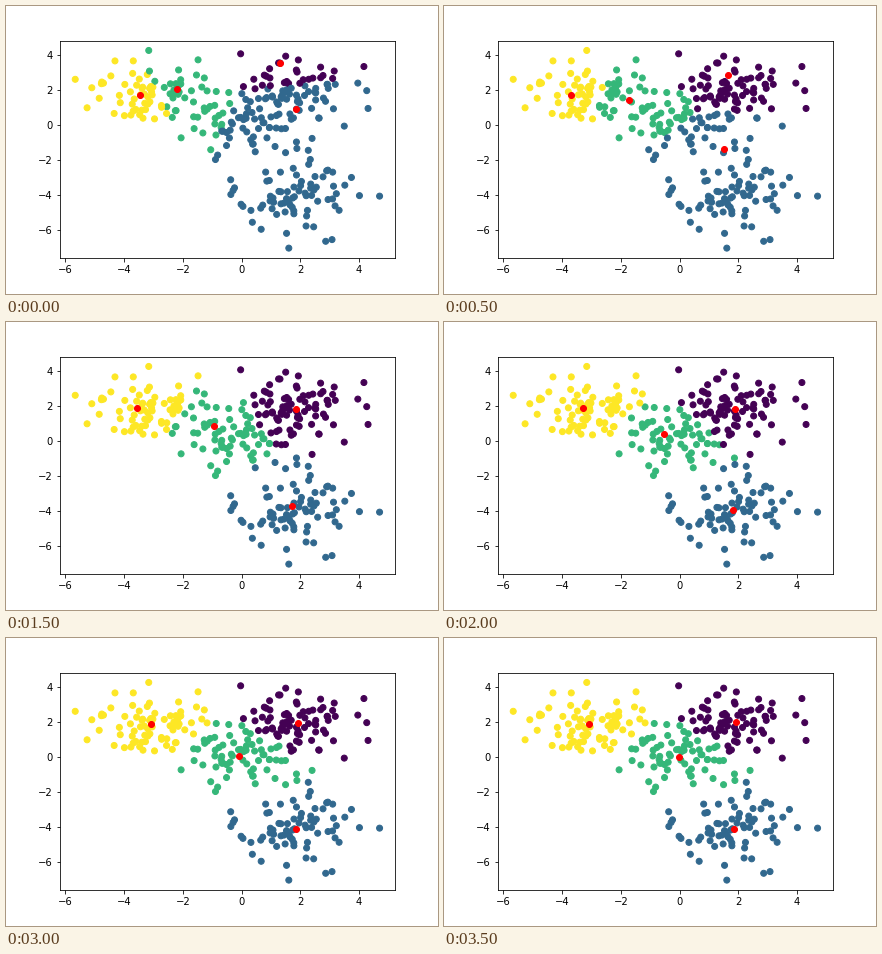
Write a matplotlib script that moves like this. It is 432 by 288 pixels and loops after 4000 ms.

```python
import matplotlib.pyplot as plt
import numpy as np
from matplotlib.animation import FuncAnimation

FRAMES, INTERVAL = 8, 500
BLOBS = [(0, 0), (2, 2), (-3, 2), (2, -4)]
PER_BLOB = 75
STARTS = [(1.308, 3.536), (1.868, 0.906), (-2.185, 2.059), (-3.441, 1.72)]


def make_points():
    rng = np.random.RandomState(0)
    points = np.concatenate(
        [rng.normal(blob, 1, (PER_BLOB, 2)) for blob in BLOBS])
    order = np.arange(len(points))
    rng.shuffle(order)
    return points[order]


def nearest(points, centers):
    """Index of the closest center for every point."""
    gaps = points[:, None] - np.asarray(centers)[None]
    return (gaps ** 2).sum(axis=2).argmin(axis=1)


def lloyd(points, centers, steps):
    """Centers and labels for each k-means step."""
    history = []
    for _ in range(steps):
        labels = nearest(points, centers)
        history.append((centers, labels))
        centers = np.array([points[labels == k].mean(axis=0)
                            for k in range(len(centers))])
    return history


points = make_points()
seeds = points[nearest(np.array(STARTS), points)]
history = lloyd(points, seeds, FRAMES)

plt.rcParams.update({"font.family": "DejaVu Sans", "font.size": 10})
fig, ax = plt.subplots(figsize=(6, 4), dpi=72, facecolor="white")
fig.subplots_adjust(left=0.125, right=0.9, bottom=0.125, top=0.88)

dots = ax.scatter(*points.T, c=history[0][1], cmap="viridis", vmin=0, vmax=3)
means = ax.scatter(*seeds.T, c="r")


def draw(i):
    centers, labels = history[i]
    dots.set_array(labels)
    means.set_offsets(centers)
    return dots, means


anim = FuncAnimation(fig, draw, frames=FRAMES, interval=INTERVAL,
                     repeat=True, repeat_delay=0)
plt.show()
```
